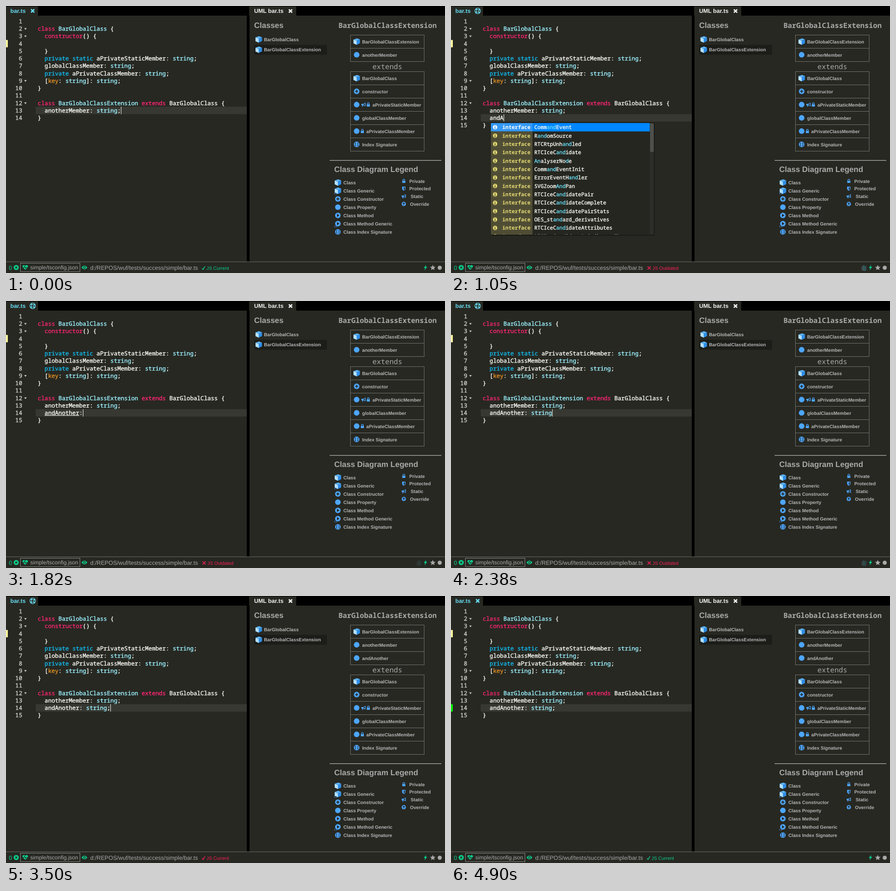
Write an HTML page that moves like this. It is 959 px wide and 584 px high and loops after 5250 ms.

```html
<!DOCTYPE html>
<html lang="en">
<head>
<meta charset="utf-8">
<title>Class diagram editor</title>
<style>
  html, body { margin: 0; width: 100%; height: 100%; overflow: hidden; background: #272822; }
  svg { display: block; width: 959px; height: 584px; }
  text { white-space: pre; text-rendering: geometricPrecision; font-family: "Liberation Sans", Arial, sans-serif; }
  .mono { font-family: "Noto Sans Mono", "DejaVu Sans Mono", monospace; }
  .mono, tspan { fill: currentColor; }
  .heavy, .heavy tspan { stroke: currentColor; stroke-width: .42px; }
</style>
</head>
<body>
<svg id="stage" viewBox="0 0 959 584">
  <g id="base"></g><g id="editor"></g><g id="uml"></g><g id="status"></g><g id="popup"></g>
</svg>
<script>
const LOOP = 5250, STEP = 70;
const BG = '#272822', WHITE = '#f8f8f2', PINK = '#f92672', CYAN = '#9cf1ff', SKY = '#12b9ec',
      ORANGE = '#e08f22', GREY = '#a9a9a9', BLUE = '#4da6ff', GREEN = [11, 207, 142], RED = [249, 31, 88];
const CHAR = 7.574, LEFT = 69, ROW = 16.25, TOP = 25.25;
const $ = id => document.getElementById(id);
const esc = s => s.replace(/&/g, '&amp;').replace(/</g, '&lt;').replace(/>/g, '&gt;');
const rgb = c => `rgb(${c.map(Math.round)})`;

// ---- drawing helpers ----
const rect = (x, y, w, h, fill, more = '') => `<rect x="${x}" y="${y}" width="${w}" height="${h}" fill="${fill}" ${more}/>`;
const path = (d, fill, more = '') => `<path d="${d}" fill="${fill}" ${more}/>`;
const line = (d, color, width) => path(d, 'none', `stroke="${color}" stroke-width="${width}"`);
const disc = (r, fill) => `<circle r="${r}" fill="${fill}"/>`;
const at = (x, y, body) => `<g transform="translate(${x} ${y})">${body}</g>`;
// text is placed by the vertical middle of its capitals
const text = (x, y, s, size, fill, more = '') =>
  `<text x="${x}" y="${y + size * .36}" font-size="${size}" fill="${fill}" ${more}>${esc(s)}</text>`;
const bold = (x, y, s, size, fill) => text(x, y, s, size, fill, 'font-weight="700"');
const mono = (x, y, body, size, color, more = '', look = '') =>
  `<text class="mono ${look}" x="${x}" y="${y + size * .357}" font-size="${size}" color="${color}" ${more}>${body}</text>`;
const heavy = (x, y, body, size, color, more) => mono(x, y, body, size, color, more, 'heavy');
const span = (s, color) => `<tspan color="${color}">${esc(s)}</tspan>`;

const cross = (c, r, w) => line(`M${-r} ${-r}L${r} ${r}M${r} ${-r}L${-r} ${r}`, c, w);
const angles = line('M-5.6 4.2l-2 2 2 2M-4 4.2l2 2-2 2', BLUE, 1);
const cube = path('M-7 -4.2L.6 -7 7.2 -4.6 0 -1.6Z', '#5db4f7') +
  path('M-7 -4.2L0 -1.6V7.2L-7 4Z', '#b4e0ff') + path('M0 -1.6L7.2 -4.6V3.8L0 7.2Z', '#2f8ee8');
const dot = disc(6.1, BLUE);
const icon = {
  cube,
  cubeGeneric: cube + angles,
  dot,
  plus: dot + line('M-3.4 0H3.4M0 -3.4V3.4', BG, 1.8),
  play: dot + path('M-2 -3.4L3.6 0 -2 3.4Z', BG),
  playGeneric: dot + path('M-2 -3.4L3.6 0 -2 3.4Z', BG) + angles,
  index: dot + line('M-1.3 -3.2H-2.8V3.2H-1.3M1.3 -3.2H2.8V3.2H1.3', BG, 1.1),
  lock: rect(-3.4, -.6, 6.8, 4.8, BLUE, 'rx=".7"') + line('M-2 0V-2A2 2 0 0 1 2 -2V0', BLUE, 1.3),
  shield: path('M-3.6 -4.4H3.6V.4Q3.4 3 0 4.8 -3.4 3 -3.6 .4Z', BLUE) + path('M0 -3H2.3V.4Q2 2.2 0 3.3Z', BG),
  horn: path('M-4.8 -1.8H-1.2L4.4 -4.4V3.6L-1.2 1.2H-1.6L-.6 4.4H-2.6L-3.4 1.2H-4.8Z', BLUE) + path('M.2 -1.2L3 -2.6V1.6L.2 .5Z', BG),
  up: disc(4.6, BLUE) + line('M0 3V-2M-2.4 0L0 -2.5 2.4 0', BG, 1.3),
  ring: disc(6.8, '#66d9ef') + disc(2.3, BG) +
    `<circle r="4.4" fill="none" stroke="${BG}" stroke-width="2" stroke-dasharray="4.3 2.61" stroke-dashoffset="2.15"/>`
};

// ---- fixed parts ----
const LABEL = '#b5b5b5';
$('base').innerHTML =
  rect(0, 0, 959, 584, BG) + rect(0, 0, 959, 21, '#000') + rect(526, 0, 6, 559, '#000') +
  rect(0, 1, 70, 20, BG) + rect(531, 1, 103, 20, BG) +
  bold(9.5, 10.5, 'bar.ts', 12.5, '#66d9ef') + bold(542, 10.5, 'UML bar.ts', 12.6, '#f0f0f0') +
  at(621.5, 11, cross('#f0f0f0', 3.6, 2.8)) +
  bold(542, 41.5, 'Classes', 17, GREY) + rect(542, 85, 159, 21.5, '#1c1d19') +
  at(552, 73, cube) + bold(563.5, 73, 'BarGlobalClass', 10.2, LABEL) +
  at(552, 95.5, cube) + bold(563.5, 95.3, 'BarGlobalClassExtension', 10.2, LABEL) +
  rect(0, 559, 959, 1, '#6c6d68');

// ---- class diagram ----
const CELL = 29;
function box(y, rows) {
  return rows.map(([name, marks], i) => {
    const mid = y + CELL * i + 14.5;
    return rect(752.5, y + CELL * i, 161, CELL, 'none', 'stroke="#73746f"') +
      marks.map(([m, x]) => at(x, mid - .3, icon[m])).join('') +
      bold({ 1: 778, 2: 787, 3: 800.5 }[marks.length], mid, name, 10.2, LABEL);
  }).join('');
}
const legend = [['cube', 'Class'], ['cubeGeneric', 'Class Generic'], ['plus', 'Class Constructor'], ['dot', 'Class Property'],
  ['play', 'Class Method'], ['playGeneric', 'Class Method Generic'], ['index', 'Class Index Signature']];
const flags = [['lock', 'Private', 881], ['shield', 'Protected', 881], ['horn', 'Static', 884], ['up', 'Override', 882.5]];
const lower =
  mono(833, 132.5, 'extends', 15.5, GREY, 'text-anchor="middle"') +
  box(143.5, [
    ['BarGlobalClass', [['cube', 766]]],
    ['constructor', [['plus', 766]]],
    ['aPrivateStaticMember', [['dot', 766], ['horn', 781], ['lock', 791.5]]],
    ['globalClassMember', [['dot', 766]]],
    ['aPrivateClassMember', [['dot', 766], ['lock', 778.5]]],
    ['Index Signature', [['index', 766]]]
  ]) +
  rect(707, 337, 244, 1.3, '#b4b4b0') + bold(717, 356.5, 'Class Diagram Legend', 17, GREY) +
  legend.map(([m, s], i) => at(725, 386 + 18 * i, icon[m]) + bold(737, 386.2 + 18 * i, s, 10.2, LABEL)).join('') +
  flags.map(([m, s, x], i) => at(869, 382.8 + 16.7 * i, icon[m]) + bold(x, 383 + 16.7 * i, s, 10.2, LABEL)).join('');

function drawUml(updated) {
  const rows = [['BarGlobalClassExtension', [['cube', 766]]], ['anotherMember', [['dot', 766]]]];
  if (updated) rows.push(['andAnother', [['dot', 766]]]);
  return mono(833.5, 42, 'BarGlobalClassExtension', 15.55, GREY, 'text-anchor="middle" font-weight="700"') +
    box(63.5, rows) + at(0, updated ? CELL : 0, lower);
}

// ---- editor ----
const code = ['', 'class BarGlobalClass {', '  constructor() {', '', '  }',
  '  private static aPrivateStaticMember: string;', '  globalClassMember: string;',
  '  private aPrivateClassMember: string;', '  [key: string]: string;', '}', '',
  'class BarGlobalClassExtension extends BarGlobalClass {', '  anotherMember: string;'];
const folds = [2, 3, 9, 12];
const syntax = /\b(class|extends|constructor)\b|\b(private|static)\b|((?<=class )\w+|\bstring\b)|\b(key)\b/g;
function highlight(s) {
  let out = '', last = 0;
  for (const m of s.matchAll(syntax)) {
    out += esc(s.slice(last, m.index)) + span(m[0], m[1] ? PINK : m[2] ? SKY : m[3] ? CYAN : ORANGE);
    last = m.index + m[0].length;
  }
  return out + esc(s.slice(last));
}
const rowTop = n => TOP + ROW * (n - 1);
const rowMid = n => rowTop(n) + 8.2;
const colX = c => LEFT + c * CHAR;

function drawEditor(s) {
  const lines = s.typed === null ? [...code, '}'] : [...code, s.typed, '}'];
  const active = s.typed === null ? 13 : 14;
  let out = rect(65, rowTop(active), 461, ROW, '#373832') + rect(0, 74.3, 4, 16, '#fdf79a');
  if (s.marker) out += rect(0, rowTop(14), 4, ROW, '#00f000');
  lines.forEach((l, i) => {
    const n = i + 1, y = rowMid(n);
    out += heavy(35.5, y, n, 12.62, '#d0d0cb', 'text-anchor="end"');
    if (folds.includes(n)) out += at(42.5, y + .3, path('M-2.8 -1.8H2.8L0 2.2Z', '#c4c4bf'));
    if (l) out += heavy(LEFT + .2, y, highlight(l), 12.62, WHITE);
    if (s.mark) for (const m of l.matchAll(new RegExp(`\\b${s.mark}\\b`, 'g')))
      out += rect(colX(m.index), Math.round(y + 5.2), CHAR * s.mark.length, 1, WHITE);
  });
  if (s.caret) out += rect(Math.round(colX(lines[active - 1].length) + .2), rowTop(active), 1, ROW, WHITE);
  return out + at(58.3, 10.7, s.dirty ? icon.ring : cross('#66d9ef', 3.6, 2.8));
}

// ---- completion list ----
const names = ['CommandEvent', 'RandomSource', 'RTCRtpUnhandled', 'RTCIceCandidate', 'AnalyserNode', 'CommandEventInit',
  'ErrorEventHandler', 'SVGZoomAndPan', 'RTCIceCandidatePair', 'RTCIceCandidateComplete', 'RTCIceCandidatePairStats',
  'OES_standard_derivatives', 'RTCIceCandidateAttributes', 'RTCIceCandidatePairChangedEvent',
  'SVGAnimatedTransformList', 'MSTransportDiagnosticsStats', 'ConstrainVideoFacingModeParameters'];
// positions of the prefix letters, each one the next found
function match(name, prefix) {
  const low = name.toLowerCase(), hits = [];
  let i = -1;
  for (const ch of prefix) {
    i = low.indexOf(ch, i + 1);
    if (i < 0) return null;
    hits.push(i);
  }
  return hits;
}
function drawPopup(prefix) {
  if (!prefix) return '';
  const found = names.filter(n => match(n, prefix)), scroll = found.length > 13;
  const pitch = 18.35, top = 256, shift = scroll ? 2 : 0;
  const width = scroll ? 356 : 342, height = scroll ? 244 : found.length * pitch + 2, cell = 89 + shift;
  let rows = '';
  found.slice(0, 14).forEach((name, i) => {
    const y = top + i * pitch, mid = y + 9.2, on = i === 0, hits = match(name, prefix);
    if (on) rows += rect(87, y, scroll ? 347.5 : 339, pitch, '#0087ff');
    rows += rect(87, y, cell, pitch, on ? '#3498f3' : '#504e35') +
      at(96.3, mid, disc(4.8, on ? '#fff' : '#e0d670') +
        path('M-1.3 -.7H.7V2.2H1.4V3.2H-1.4V2.2H-.7V.3H-1.3ZM-.7 -3.2H.8V-1.7H-.7Z', on ? '#0087ff' : '#504e35')) +
      mono(110 + shift, mid, 'interface', 11.4, on ? '#fff' : '#e6db74', 'font-weight="600"') +
      heavy(180 + shift, mid, [...name].map((c, k) => hits.includes(k) ? span(c, '#66d9ef') : c).join(''), 11.38, WHITE);
  });
  if (scroll) rows += rect(434.5, top, 8.5, height, '#2d2e2a') + rect(435, top + 1, 8, 62, '#4f504c');
  return rect(87, top, width + 2, height + 2.5, 'rgba(0,0,0,.3)') + rect(86.5, 255.5, width, height + 1, '#252620', 'stroke="#1d1e1a"') +
    `<clipPath id="list"><rect x="86" y="255" width="${width + 1}" height="${height + 1}"/></clipPath><g clip-path="url(#list)">${rows}</g>`;
}

// ---- status bar ----
const G = rgb(GREEN);
const heart = path('M0 5.5L-5.5 0C-7.6 -3 -3.6 -7 0 -3.2 3.6 -7 7.6 -3 5.5 0Z', G) + line('M-6.5 .2H-2.5L-1.3 -2.2 .6 2.4 2 .2H6.5', BG, 1.1);
const eye = path('M-6.3 0Q0 -8 6.3 0 0 8 -6.3 0Z', G) + disc(2.7, BG) + disc(1.6, G);
const star = [...Array(10)].map((_, i) => {
  const r = i % 2 ? 2.9 : 6.2, a = i * Math.PI / 5;
  return `${(r * Math.sin(a)).toFixed(2)},${(-r * Math.cos(a)).toFixed(2)}`;
}).join(' ');
const books = path('M-5 -4L-2.2 -2.6V6L-5 5Z', '#6f8088') + path('M-1.6 -6.5L1.4 -4.8V7L-1.6 5.4Z', '#4fb3bf') + path('M2 -3.6L5.2 -5V5L2 7Z', '#3f8ea0');

function drawStatus(s) {
  const c = rgb(s.tint);
  return text(6.3, 572.2, '0', 12.6, G) + at(22.3, 572, disc(5.6, G) + cross(BG, 2, 1.7)) +
    rect(31.5, 562.5, 130, 18.5, 'none', 'stroke="#8f908b"') + at(42, 571.5, heart) +
    text(53, 572, 'simple/tsconfig.json', 12, GREY) + at(171.3, 572, eye) +
    text(184, 572, 'd:/REPOS/wuf/tests/success/simple/bar.ts', 12.65, GREY) +
    (s.outdated
      ? at(432.8, 573, cross(c, 3.5, 1.7)) + text(440, 573, 'JS Outdated', 10.25, c)
      : at(431.5, 573, line('M-3.3 .8L-1 3.4 3.2 -3.6', c, 1.5)) + text(438, 573, 'JS Current', 10.25, c)) +
    at(916.3, 572, path('M1.8 -6.2L-3.6 1H-.5L-2.2 6.6 3.8 -1.6H.4Z', G)) +
    at(932.3, 572.5, `<polygon points="${star}" fill="${GREY}"/>`) + at(947.5, 572.5, disc(4.5, GREY)) +
    (s.count ? text(890.5, 573.5, '0', 7, '#8a8b86') : '') +
    `<g opacity="${s.busy}">${at(902, 573, books)}</g>`;
}

// ---- timeline ----
const WORD = '  andAnother: string;';
const keys = [[0, 0], [210, 2], [840, 3], [910, 4], [980, 5], [1050, 6], [1190, 7], [1330, 8], [1400, 9], [1540, 10],
  [1610, 11], [1680, 12], [1820, 13], [1890, 14], [1960, 15], [2030, 16], [2100, 17], [2170, 18], [2240, 19], [2310, 20], [2520, 21]];
const hints = [[0, ''], [980, 'an'], [1050, 'and'], [1120, 'anda'], [1260, 'andan'], [1330, 'andano'], [1470, 'andanot'], [1540, '']];
const marks = [[0, ''], [1750, 'andAnother'], [1890, ''], [2590, 'string'], [2800, '']];
const blink = [[0, 1], [3010, 0], [3500, 1], [3990, 0], [4410, 1], [4900, 0]];
const busy = [[0, 0], [770, 0], [1050, .45], [1330, .9], [1470, .85], [1820, .15], [1960, .25], [2170, .7], [2380, .3], [2520, .3], [2660, .4], [2800, 0], [LOOP, 0]];

const pick = (table, t) => table.filter(k => k[0] <= t).pop()[1];
function tween(table, t) {
  const i = table.findIndex(k => k[0] > t), [t0, a] = table[i - 1], [t1, b] = table[i];
  return a + (b - a) * (t - t0) / (t1 - t0);
}
const ease = (t, from, to) => {
  const p = Math.min(1, Math.max(0, (t - from) / (to - from)));
  return p * p * (3 - 2 * p);
};
const within = (t, a, b) => t >= a && t < b;

function stateAt(t) {
  const n = pick(keys, t), red = ease(t, 210, 700) - ease(t, 3500, 3990);
  return {
    typed: n ? WORD.slice(0, n) : null,
    hint: pick(hints, t), mark: pick(marks, t), caret: pick(blink, t),
    dirty: within(t, 210, 4340), marker: t >= 4410, updated: t >= 3500,
    outdated: within(t, 210, 3500), tint: GREEN.map((g, i) => g + (RED[i] - g) * red),
    busy: tween(busy, t), count: within(t, 1190, 1470)
  };
}

const drawn = {};
function put(id, html) {
  if (drawn[id] !== html) $(id).innerHTML = drawn[id] = html;
}
let last = -1;
function frame() {
  const step = Math.floor(performance.now() % LOOP / STEP);
  if (step !== last) {
    last = step;
    const s = stateAt(step * STEP);
    put('editor', drawEditor(s));
    put('uml', drawUml(s.updated));
    put('status', drawStatus(s));
    put('popup', drawPopup(s.hint));
  }
  requestAnimationFrame(frame);
}
frame();
</script>
</body>
</html>
```
